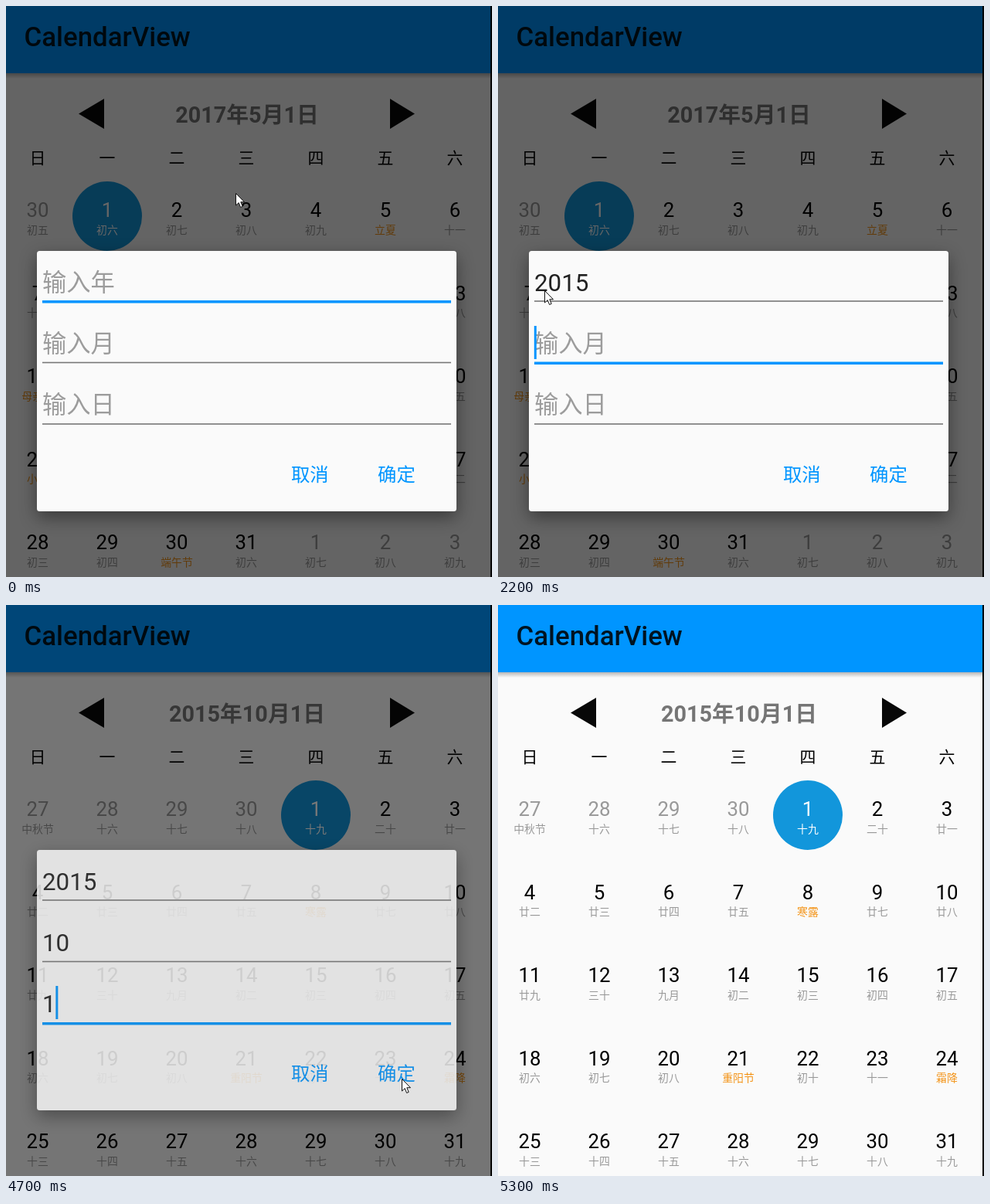
Recreate the animation shown at these times as an HTML page. Size 629x739 px, loop 6100 ms.

```html
<!DOCTYPE html>
<html lang="zh-CN">
<head>
<meta charset="utf-8">
<title>CalendarView</title>
<style>
  html, body { margin: 0; width: 100%; height: 100%; overflow: hidden; background: #fafafa; }
  svg { display: block; width: 629px; height: 739px; }
  text { font-family: Roboto, "Noto Sans CJK SC", "Noto Sans CJK", sans-serif; white-space: pre; }
  .mid { text-anchor: middle; }
  .bar-title { font-size: 34.8px; font-weight: 500; fill: rgba(0,0,0,.87); }
  .month-title { font-size: 28.8px; font-weight: 700; fill: #757575; }
  .week { font-size: 20.9px; }
  .day { font-size: 25.8px; }
  .lunar { font-size: 13.9px; fill: #999; }
  .out { fill: #999; }
  .festival { fill: #f39419; }
  .chosen { fill: #fff; }
  .field { font-size: 31.3px; }
  .button { font-size: 24.4px; fill: #0095ff; }
  .panel { fill: #fafafa; filter: drop-shadow(0 8px 11px rgba(0,0,0,.42)); }
</style>
</head>
<body>
<svg id="stage" viewBox="0 0 629 739">
  <defs>
    <linearGradient id="shade" x2="0" y2="1">
      <stop offset="0" stop-opacity=".27"/>
      <stop offset="1" stop-opacity="0"/>
    </linearGradient>
  </defs>
  <rect width="629" height="739" fill="#fafafa"/>
  <rect width="627" height="87" fill="#0095ff"/>
  <rect y="87" width="627" height="7" fill="url(#shade)"/>
  <text class="bar-title" x="23.5" y="51.5">CalendarView</text>
  <path d="M94 139.5L127 120V159ZM529 139.5L497 120V159Z" fill="#080808"/>
  <g id="calendar"></g>
  <rect id="dim" width="627" height="739"/>
  <g id="dialog">
    <rect class="panel" x="40" y="317" width="543" height="337" rx="3.5"/>
    <text class="button mid" x="393.3" y="614.5">取消</text>
    <text class="button mid" x="505.5" y="614.5">确定</text>
  </g>
  <path id="cursor" d="M.5.5V16L4.2 12.6 6.6 18.5 9.2 17.4 6.8 11.7H11.5Z" fill="#fff" stroke="#111" stroke-width="1"/>
  <rect x="627" width="2" height="739"/>
</svg>
<script>
const LOOP = 6100;
const BLUE = '#0095ff';
const $ = id => document.getElementById(id);

function add(parent, tag, attrs, text = '') {
  const el = document.createElementNS('http://www.w3.org/2000/svg', tag);
  for (const key in attrs) el.setAttribute(key, attrs[key]);
  el.textContent = text;
  parent.appendChild(el);
  return el;
}

const colX = col => 41 + 90 * col;
const NUMERALS = '一二三四五六七八九十';

// Name of a lunar day, 1 to 30
function lunarName(n) {
  if (n === 20) return '二十';
  if (n === 30) return '三十';
  const tens = Math.floor((n - 1) / 10);
  return (n === 10 ? '初' : ['初', '十', '廿'][Math.floor(n / 10)] && (n < 10 ? '初' : ['', '十', '廿'][Math.floor(n / 10)]))
    + NUMERALS[n === 10 ? 9 : (n - 1) - 10 * tens];
}

// Both months follow a 30 day month and a 30 day lunar month.
function buildMonth({ title, lead, lunar, newMoon, festivals, plain = {} }) {
  const g = add($('calendar'), 'g', {});
  add(g, 'text', { class: 'month-title mid', x: 312, y: 150.5 }, title);
  add(g, 'circle', { cx: colX(lead), cy: 272, r: 45, fill: '#1296db' });
  for (let i = 0; i < 35; i++) {
    const x = colX(i % 7), top = 107.5 * Math.floor(i / 7);
    const date = i - lead + 1;
    const inside = date >= 1 && date <= 31;
    const shown = inside ? date : date < 1 ? date + 30 : date - 31;
    const age = (lunar + i - 1) % 30 + 1;
    const festival = festivals[date];
    const name = festival || plain[date] || (age === 1 ? newMoon : lunarName(age));
    const tone = date === 1 ? ' chosen' : '';
    add(g, 'text', { class: 'day mid' + (tone || (inside ? '' : ' out')), x, y: 273.2 + top }, shown);
    add(g, 'text', { class: 'lunar mid' + (tone || (festival ? ' festival' : '')), x, y: 294.8 + top }, name);
  }
  return g;
}

[...'日一二三四五六'].forEach((name, col) =>
  add($('calendar'), 'text', { class: 'week mid', x: colX(col), y: 204 }, name));

const before = buildMonth({
  title: '2017年5月1日', lead: 1, lunar: 5, newMoon: '五月',
  festivals: { 5: '立夏', 14: '母亲节', 21: '小满', 30: '端午节' }
});
const after = buildMonth({
  title: '2015年10月1日', lead: 4, lunar: 15, newMoon: '九月',
  festivals: { 8: '寒露', 21: '重阳节', 24: '霜降' }, plain: { '-3': '中秋节' }
});

// The first focus time sets the phase of the caret blink.
const fields = [
  { hint: '输入年', value: '2015', focus: -500, keys: [1300, 1500, 1900, 2000] },
  { hint: '输入月', value: '10', focus: 2200, keys: [2600, 2800] },
  { hint: '输入日', value: '1', focus: 3100, keys: [3400] }
];
fields.forEach((f, i) => {
  f.text = add($('dialog'), 'text', { class: 'field', x: 47, y: 368.8 + 79.3 * i });
  f.line = add($('dialog'), 'rect', { x: 47, width: 529 });
  f.top = 381 + 79.5 * i;
});
const caret = add($('dialog'), 'rect', { width: 3, height: 43, fill: BLUE });

// [time, x, y]
const moves = [
  [0, 297, 242], [100, 277, 254], [200, 190, 302], [300, 78, 346], [400, 20, 363], [500, 60, 368],
  [3800, 98, 400], [3900, 255, 520], [4000, 430, 606], [4100, 511, 625], [4300, 512, 613],
  [5200, 551, 605], [5300, -50, -50]
];
// [time, dim opacity, dialog opacity]
const fades = [[0, .6, 1], [4700, .53, .82], [4800, .18, 0], [4900, 0, 0]];

const at = (keys, t) => keys.filter(k => k[0] <= t).pop();
const show = (el, on) => el.setAttribute('visibility', on ? 'visible' : 'hidden');

function drawField(f, i, t, active) {
  const typed = f.keys.filter(k => k <= t);
  const text = f.value.slice(0, typed.length);
  f.text.textContent = text || f.hint;
  f.text.setAttribute('fill', text ? '#212121' : '#9c9c9c');
  f.line.setAttribute('y', active ? f.top : f.top + .2);
  f.line.setAttribute('height', active ? 3.5 : 1.6);
  f.line.setAttribute('fill', active ? BLUE : '#777');
  if (!active) return;
  const since = t - Math.max(f.focus, ...typed);
  caret.setAttribute('x', 46.8 + 17.55 * text.length);
  caret.setAttribute('y', 335 + 79 * i);
  show(caret, Math.floor(since / 500) % 2 === 0);
}

function render(t) {
  const changed = t >= 4700;
  show(before, !changed);
  show(after, changed);

  const current = fields.filter(f => f.focus <= t).pop();
  fields.forEach((f, i) => drawField(f, i, t, f === current));

  const [, dim, dialog] = at(fades, t);
  $('dim').setAttribute('opacity', dim);
  $('dialog').setAttribute('opacity', dialog);

  const [, x, y] = at(moves, t);
  $('cursor').setAttribute('transform', `translate(${x} ${y})`);
}

const start = performance.now();
function tick() {
  render((performance.now() - start) % LOOP);
  requestAnimationFrame(tick);
}
render(0);
requestAnimationFrame(tick);
</script>
</body>
</html>
```
